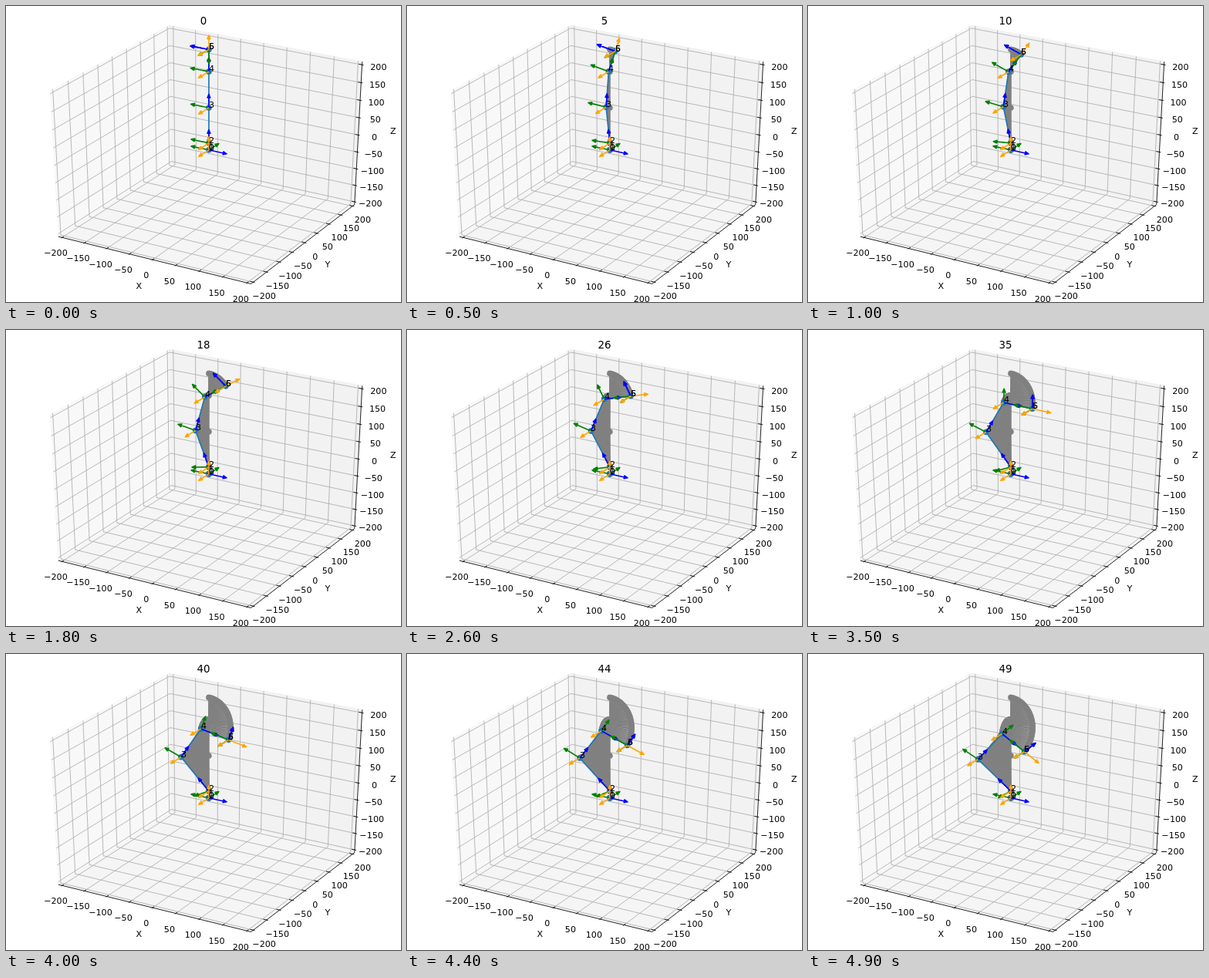
Recreate the animation shown at these times as an HTML page. Size 512 by 384 pixels, loop 5000 ms.

```html
<!DOCTYPE html>
<html lang="en">
<head>
<meta charset="utf-8">
<title>Robot arm in 3D axes</title>
<style>
html, body { margin: 0; width: 100%; height: 100%; overflow: hidden; background: #fff; }
svg { display: block; width: 512px; height: 384px; }
text { font: 11.11px "DejaVu Sans", sans-serif; fill: #000; }
#title { font-size: 13.33px; }
.mid { text-anchor: middle; }
.grid { fill: none; stroke: #b0b0b0; stroke-width: .89; }
.axis { fill: none; stroke: #000; stroke-width: .85; }
.link { fill: none; stroke-width: 1.67; stroke-linejoin: round; }
</style>
</head>
<body>
<svg id="stage" viewBox="0 0 512 384">
  <g id="box"></g>
  <g id="trail"></g>
  <g id="arm"></g>
  <text id="title" class="mid" x="256" y="24">0</text>
</svg>
<script>
const FRAMES = 50, STEP = 100;
const REACH = 40;              // length of a frame axis
const EDGE = 400 * 25 / 48;    // padded half size of the box
const TICK = 400 / 12;
const COLORS = ['#0000ff', '#008000', '#ffa500'];
const ORDER = [1, 2, 0, 3, 4, 6, 5];
const byId = id => document.getElementById(id);

function add(parent, tag, attrs, text) {
  const el = document.createElementNS('http://www.w3.org/2000/svg', tag);
  for (const key in attrs) el.setAttribute(key, attrs[key]);
  if (text !== undefined) el.textContent = text;
  parent.appendChild(el);
  return el;
}

// Perspective view: elevation 30, azimuth -60, distance 10
function project([x, y, z]) {
  const a = x / 400, b = y / 400, c = z / 400, s = Math.sqrt(3) / 2;
  const depth = 10 - (s / 2 * a - .75 * b + .5 * c);
  const u = (s * a + .5 * b) / depth;
  const v = (-.25 * a + s / 2 * b + s * c) / depth;
  return [512 * (u + .095) / .185, 384 * (1 - (v + .095) / .185)];
}

const points = list => list.map(p => project(p).map(n => n.toFixed(2)).join()).join(' ');

function line(parent, cls, list) {
  return add(parent, 'polyline', { class: cls, points: points(list) });
}

function drawBox() {
  const box = byId('box'), E = EDGE;
  const panes = [
    ['#f8f8f8', [[-E, -E, -E], [-E, E, -E], [-E, E, E], [-E, -E, E]]],
    ['#f2f2f2', [[-E, E, -E], [E, E, -E], [E, E, E], [-E, E, E]]],
    ['#f5f5f5', [[-E, -E, -E], [E, -E, -E], [E, E, -E], [-E, E, -E]]]
  ];
  for (const [color, list] of panes)
    add(box, 'polygon', { points: points(list), fill: color, stroke: color });

  // at(t, d): point t along the axis, moved d outwards
  const axes = [
    { name: 'X', at: (t, d) => [t, -E - d, -E - d], tick: (t, d) => [t, -E - d, -E],
      grid: t => [[t, -E, -E], [t, E, -E], [t, E, E]] },
    { name: 'Y', at: (t, d) => [E + d, t, -E - d], tick: (t, d) => [E + d, t, -E],
      grid: t => [[E, t, -E], [-E, t, -E], [-E, t, E]] },
    { name: 'Z', at: (t, d) => [E + d, E + d, t], tick: (t, d) => [E + d, E, t],
      grid: t => [[E, E, t], [-E, E, t], [-E, -E, t]] }
  ];
  const perPoint = 48 / 806.4 * TICK;
  for (const { name, at, tick, grid } of axes) {
    for (let t = -200; t <= 200; t += 50) line(box, 'grid', grid(t));
    line(box, 'axis', [at(-E, 0), at(E, 0)]);
    for (let t = -200; t <= 200; t += 50) {
      line(box, 'axis', [tick(t, .1 * TICK), tick(t, -.2 * TICK)]);
      const [x, y] = project(at(t, 11.5 * perPoint));
      add(box, 'text', { class: 'mid', x: x.toFixed(1), y: Math.round(y + 8.4) },
        (t < 0 ? '\u2212' : '') + Math.abs(t));
    }
    const [x, y] = project(at(0, 25 * perPoint));
    add(box, 'text', { class: 'mid', x: x.toFixed(1), y: Math.round(y + 3.1) }, name);
  }
}

const along = (p, dir, len) => p.map((n, i) => n + dir[i] * len);
const heading = a => [Math.sin(a), 0, Math.cos(a)];
const turned = a => [-Math.cos(a), 0, Math.sin(a)];
const BACK = [0, -1, 0];

// Joint positions and axis directions at step k
function pose(k) {
  const rad = k * Math.PI / 180;
  const lower = -.918 * rad, upper = .64 * rad, hand = 2.61 * rad;
  const base = [0, 0, 0], shoulder = [0, 0, 20];
  const elbow = along(shoulder, heading(lower), 100);
  const wrist = along(elbow, heading(upper), 100);
  const tip = along(wrist, heading(hand), 60);
  const flat = a => [heading(a), turned(a), BACK];
  return {
    joints: [base, base, shoulder, elbow, wrist, tip, tip],
    dirs: [
      [[1, 0, 0], [0, 1, 0], [0, 0, 1]],
      flat(0), flat(lower), flat(upper), flat(hand),
      flat(hand - Math.PI / 2),
      [heading(hand - Math.PI / 2), BACK, heading(hand)]
    ]
  };
}

function drawLinks(parent, joints, color) {
  add(parent, 'polyline', { class: 'link', points: points(joints), stroke: color });
  for (const j of joints.slice(1, 6)) {
    const [cx, cy] = project(j);
    add(parent, 'circle', { cx, cy, r: 3.8, fill: color });
  }
}

function drawArrow(parent, from, to, color) {
  const [x0, y0] = project(from), [x1, y1] = project(to);
  const len = Math.hypot(x1 - x0, y1 - y0);
  if (len < .5) return;
  const c = (x1 - x0) / len, s = (y1 - y0) / len;
  const spot = (d, w) => `${(x1 - d * c - w * s).toFixed(2)} ${(y1 - d * s + w * c).toFixed(2)}`;
  add(parent, 'path', {
    d: `M${x0.toFixed(2)} ${y0.toFixed(2)}L${spot(5, 0)}M${spot(1, 0)}L${spot(5.6, 1.9)}L${spot(5.6, -1.9)}Z`,
    fill: color, stroke: color, 'stroke-width': 1.6, 'stroke-linejoin': 'round'
  });
}

function drawArm(k) {
  const arm = byId('arm'), { joints, dirs } = pose(k);
  arm.textContent = '';
  drawLinks(arm, joints, '#1f77b4');
  for (const n of ORDER)
    dirs[n].forEach((dir, i) => drawArrow(arm, joints[n], along(joints[n], dir, REACH), COLORS[i]));
  joints.forEach((j, n) => {
    const [x, y] = project(j);
    add(arm, 'text', { x: Math.round(x), y: Math.round(y) }, n);
  });
}

drawBox();
const ghosts = [];
for (let k = 0; k < FRAMES - 1; k++) {
  const g = add(byId('trail'), 'g', {});
  drawLinks(g, pose(k).joints, '#808080');
  ghosts.push(g);
}

let shown = -1;
const start = performance.now();
function show(now) {
  const k = Math.floor(Math.max(0, now - start) / STEP) % FRAMES;
  if (k !== shown) {
    shown = k;
    ghosts.forEach((g, i) => g.setAttribute('display', i < k ? 'inline' : 'none'));
    drawArm(k);
    byId('title').textContent = k;
  }
  requestAnimationFrame(show);
}
show(start);
</script>
</body>
</html>
```
